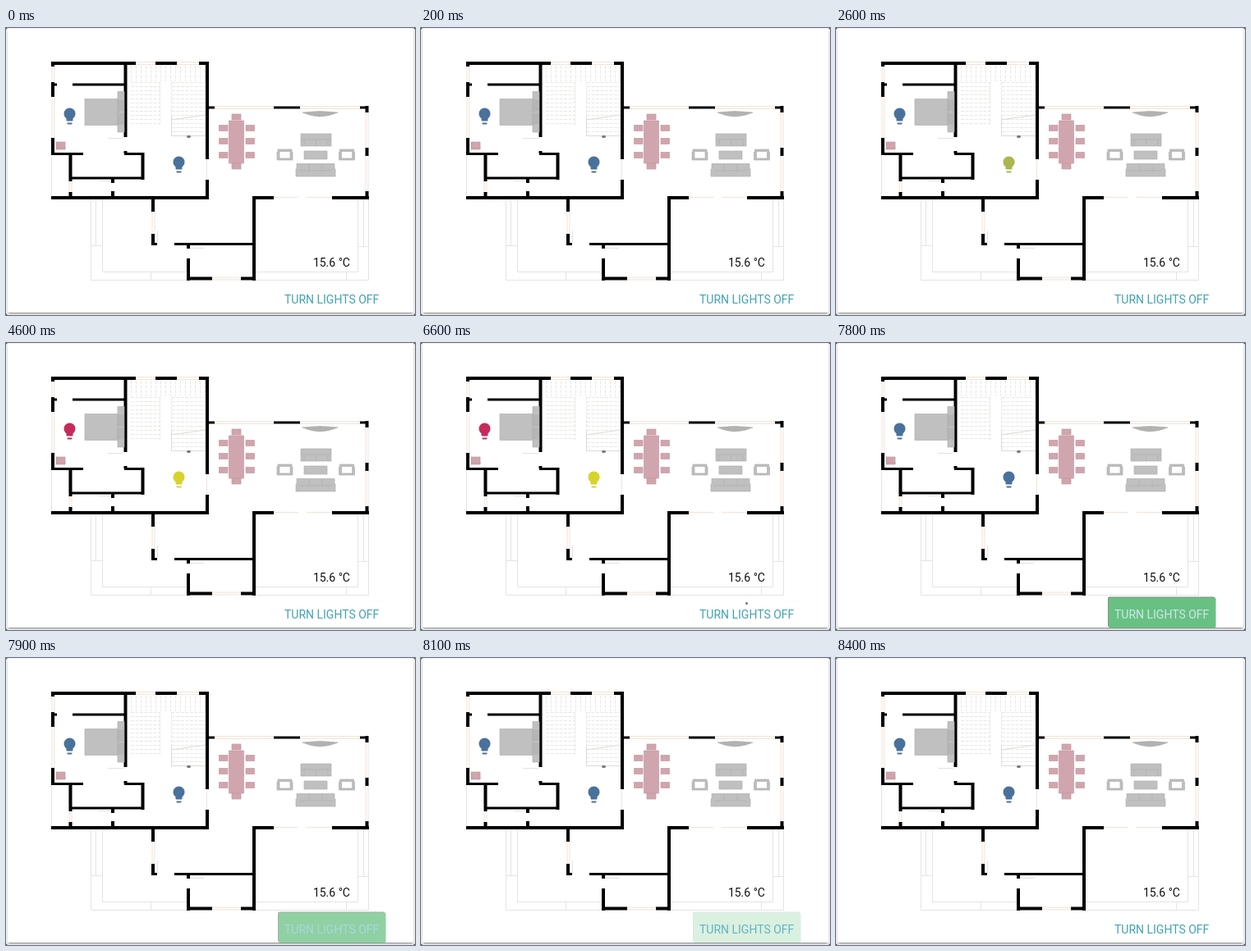
An HTML page for the animation above (8.5 s loop, 498x350 px).

```html
<!DOCTYPE html>
<html lang="en">
<head>
<meta charset="utf-8">
<title>Floor plan</title>
<style>
  html, body { margin: 0; width: 100%; height: 100%; overflow: hidden; }
  html { background: #333; }
  body { background: #f8f8f8; border-radius: 3px; }
  .card {
    position: absolute; left: 2px; top: 1px; width: 494px; height: 346px;
    background: #fff; border-radius: 2px;
    box-shadow: 0 2px 2px rgba(0,0,0,.14), 0 1px 5px rgba(0,0,0,.12), 0 3px 1px -2px rgba(0,0,0,.2);
  }
  svg { position: absolute; left: 0; top: 0; display: block; }
  text { font: 14px Roboto, sans-serif; }
  #button { filter: drop-shadow(-.7px -.7px .4px #666); }
</style>
</head>
<body>
<div class="card"></div>
<svg width="498" height="350" viewBox="0 0 498 350" fill="none">
  <defs>
    <path id="bulb" d="M12 2A7 7 0 0 0 5 9C5 11.38 6.19 13.47 8 14.74V17A1 1 0 0 0 9 18H15A1 1 0 0 0 16 17V14.74C17.81 13.47 19 11.38 19 9A7 7 0 0 0 12 2M9 21A1 1 0 0 0 10 22H14A1 1 0 0 0 15 21V20H9Z"/>
    <path id="armchair" d="M1 0H18V3H19V13H0V3H1ZM3 3V11H16V3" fill="#bdbdbd" stroke="#b0b0b0" stroke-width=".7"/>
  </defs>

  <!-- terrace -->
  <path stroke="#e4e4e4" d="M103.500 209V307.500H220M117.500 209V297.500H220M103 265.500H117.500M109.500 209V265M176.500 297V307M304 297.500H428.500V209M304 307.500H441.500V209M428 266.500H441M435.500 209V266M414.500 297V307M55.500 156V205M76.500 156V183"/>

  <!-- windows -->
  <g stroke="#f2e4da" stroke-width="4">
    <path id="frames" d="M158 43H182M208 43H235M57.500 84V134M57.500 46V67M254 97H326M358 97H431M439.500 103V146M439.500 156V199M179.500 224V262M251 305.500H286M78.500 187V204"/>
    <use href="#frames" stroke="#fffcfa" stroke-width="2"/>
    <path stroke-width="1" d="M326 206.500H356M366 206.500H397M244.500 160V185"/>
  </g>
  <path stroke="#e2e2e2" d="M124 134.500H143M184.500 247V262M224 268.500H241M113 186.500H129"/>

  <g id="stairs" stroke="#eae7e3" stroke-dasharray="4 1.500"></g>
  <path stroke="#dedbd6" d="M201.500 107V131M201 131.500H243M201 112L243 106"/>
  <ellipse cx="222.500" cy="132.500" rx="2.500" ry="1.700" fill="#777b80"/>

  <!-- outer walls, then the thinner inner ones -->
  <g stroke="#000">
    <path stroke-width="4" d="M55 43H158M182 43H208M235 43H247M57 41V47M57 66V84M57 134V154M145.500 41V133M145.500 150V153M166.500 152V185M78.500 152V187M130 183V189M130 199V207M78.500 200V207M55 207H247M245 41V160M245 185V209M439.500 95V103M439.500 146V156M439.500 199V209M302 207H326M397 207H442M302 205V308M179 207V224M179 251V265M222 263V269M222 281V308M220 305.500H251M286 305.500H304"/>
    <path stroke-width="3" d="M55 69H62M81 69H146M55 153.500H94M144 153.500H168M77 183H168M245 97H254M326 97H358M431 97H441M177 263.500H184M205 263.500H304"/>
  </g>

  <!-- furniture -->
  <g fill="#c0c0c0" stroke="#b0b0b0" stroke-width=".7">
    <path d="M96 86.500H136V118.500H96ZM136 77.500H144V127H136Z"/>
    <path d="M137 88H143V101H137ZM137 104H143V117H137Z" fill="#b6b6b6"/>
    <path d="M359 129H396V144H359ZM359 136H396M377.500 136V144M363 136V144M392 136V144"/>
    <path d="M354 165.500H400V172H401V181H353V172H354ZM357 174H397M369 166V174M385 166V174"/>
    <path d="M363 150H391V160H363Z"/>
    <path d="M361 103Q382 100 404 103Q394 107.500 382 108Q371 107.500 361 103Z" fill="#b2b2b2"/>
  </g>
  <use href="#armchair" x="330" y="148"/>
  <use href="#armchair" x="405.500" y="148"/>
  <g id="dining" fill="#d0a5ae" stroke="#c39aa3" stroke-width=".7">
    <path d="M271.500 113H289.500V165H271.500ZM61 139H72V148H61ZM61 146H73"/>
  </g>

  <use id="bedroom" href="#bulb" x="65.500" y="95.500"/>
  <use id="hall" href="#bulb" x="198.500" y="154.500"/>
  <text x="419" y="290.500" text-anchor="end" fill="#111">15.6 °C</text>
  <rect id="button" x="332" y="310.500" width="130.500" height="37" rx="2" fill="#34ac59"/>
  <circle id="touch" cx="396.500" cy="317.500" r="1.500" fill="#69757c"/>
  <text id="label" x="339" y="335.500">TURN LIGHTS OFF</text>
</svg>
<script>
const LOOP = 8500, STEP = 100;
const BLUE = [74, 113, 155], YELLOW = [214, 211, 45], RED = [196, 43, 91];
const TEAL = [66, 163, 178], WHITE = [255, 255, 255];
const $ = id => document.getElementById(id);
const addPath = (id, d) => $(id).insertAdjacentHTML('beforeend', `<path d="${d}"/>`);

for (let y = 66.5; y < 118; y += 5) addPath('stairs', `M152 ${y}H188`);
for (let y = 66.5; y < 130; y += 5) addPath('stairs', `M202 ${y}H243`);
for (let x = 152.5; x < 243; x += 6) addPath('stairs', `M${x} 46V65`);
addPath('stairs', 'M187.500 66V118M201.500 66V108');

for (const y of [118.5, 134.5, 151.5])
  addPath('dining', `M259.500 ${y}H270V${y + 7}H259.500ZM292 ${y}H302.500V${y + 7}H292Z`);
for (const y of [105, 165]) addPath('dining', `M275 ${y}H286V${y + 7}H275Z`);

const mix = (a, b, p) => `rgb(${a.map((v, i) => Math.round(v + (b[i] - v) * p))})`;

function smooth(t, start, end) {
  const p = Math.min(1, Math.max(0, (t - start) / (end - start)));
  return p * p * (3 - 2 * p);
}

// Lamp colours settle within three steps of a change.
function settle(t, start) {
  const n = (t - start) / STEP + 1;
  return n <= 0 ? 0 : n >= 3 ? 1 : 1 - 0.3 ** n;
}

function draw(now) {
  const t = Math.floor(now % LOOP / STEP) * STEP;
  const on = 1 - settle(t, 6700);
  const pressed = smooth(t, 6600, 7000) * (1 - smooth(t, 7550, 8300));
  $('hall').setAttribute('fill', mix(BLUE, YELLOW, settle(t, 2600) * on));
  $('bedroom').setAttribute('fill', mix(BLUE, RED, settle(t, 4200) * on));
  $('button').setAttribute('opacity', pressed);
  $('label').setAttribute('fill', mix(TEAL, WHITE, pressed));
  $('touch').setAttribute('opacity', t === 6600 ? 1 : 0);
}

const start = performance.now();
function tick() {
  draw(performance.now() - start);
  requestAnimationFrame(tick);
}
tick();
</script>
</body>
</html>
```
